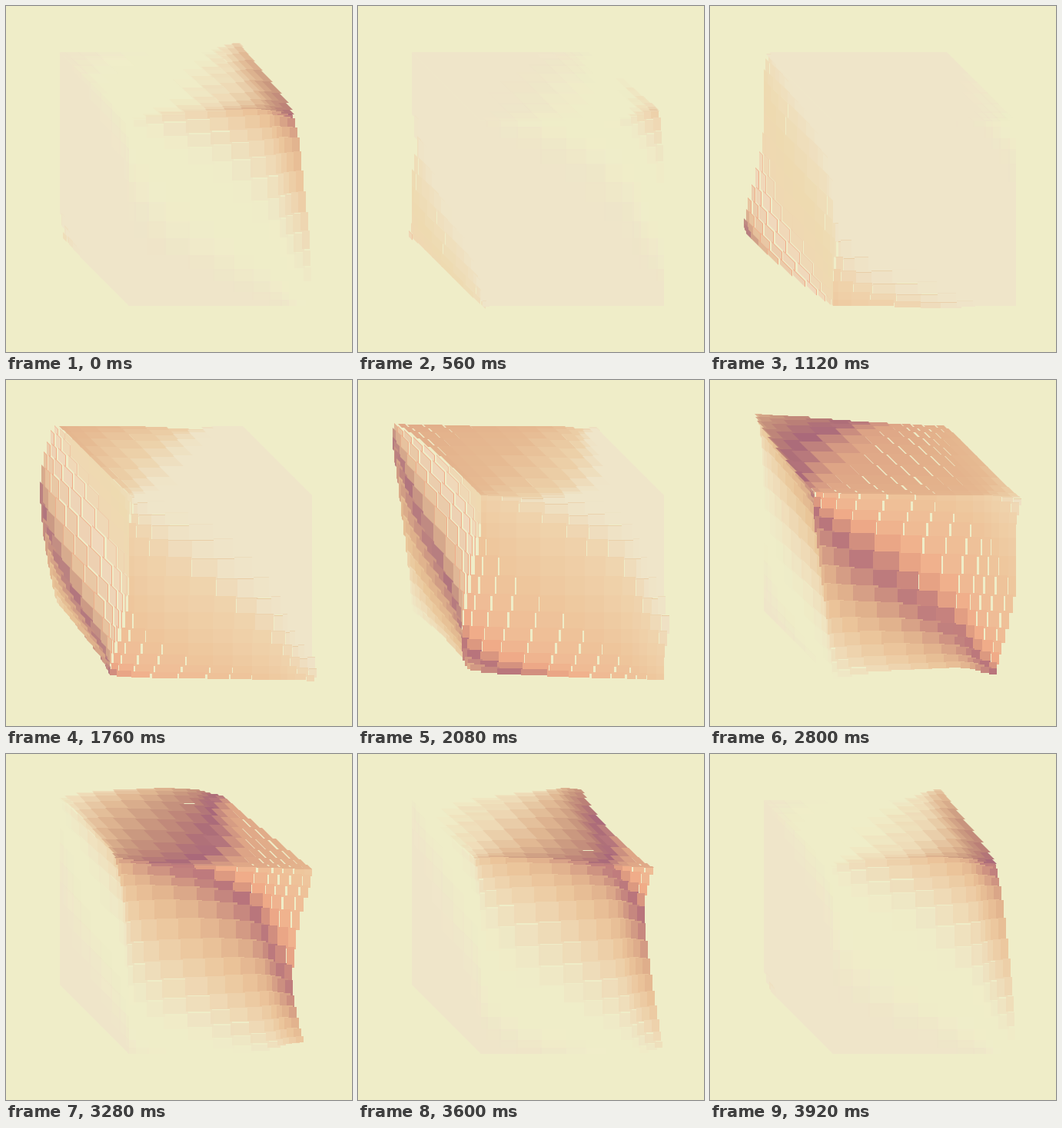
Animation of 450 by 450 pixels, one loop 4 s. Source, as an HTML page without scripts:

```html
<!DOCTYPE html>
<html lang="en">
<head>
<meta charset="utf-8">
<title>Wave over a block cube</title>
<style>
html, body { margin: 0; width: 100%; height: 100%; overflow: hidden; background: #efedc8; }
.stage {
  position: relative; width: 450px; height: 450px; overflow: hidden;
  --u: 7px 17px 22px 31px 32px 26px 25px 22px 15px 9px 10px 12px 10px;
  --v: 7px 15px 14px 19px 24px 26px 25px 22px 22px 18px 16px 14px 10px 8px;
  --w: 3px 5px 8px 10px 12px 14px 14px 11px 7px 4px 2px;
}
.face {
  position: absolute; left: 70px; top: 60px; display: grid;
  grid-template-rows: var(--rows); transform-origin: 0 0;
  --a: 0; --b: 0;
}
ul { margin: 0; padding: 0; list-style: none; display: grid; grid-template-columns: var(--cols); }
/* cells reach under their neighbours, so only thin gaps open */
li {
  position: relative; margin: 0 -2px -2px 0;
  animation: var(--tint) 4s linear infinite, drift 4s linear infinite;
  animation-delay: calc(var(--base) + var(--i) * var(--si) + var(--j) * var(--sj));
}
li:last-child { margin-right: 0; }
ul:last-child li { margin-bottom: 0; }
/* --a and --b undo the slant of a face, so every face drifts alike on screen */
.left  { --cols: var(--w); --rows: var(--v); --tint: left; --base: -3047ms; --si: 67ms; --sj: -89ms; --b: 1; transform: matrix(1, 1, 0, 1, 0, 0); }
.top   { --cols: var(--u); --rows: var(--w); --tint: top; --base: -3085ms; --si: 81ms; --sj: 64ms; --a: 1; transform: matrix(1, 0, 1, 1, 0, 0); }
.front { --cols: var(--u); --rows: var(--v); --tint: front; --base: -2312ms; --si: 81ms; --sj: -89ms; left: 160px; top: 150px; }

ul:nth-child(1) { --j: 1 } li:nth-child(1) { --i: 1 }
ul:nth-child(2) { --j: 2 } li:nth-child(2) { --i: 2 }
ul:nth-child(3) { --j: 3 } li:nth-child(3) { --i: 3 }
ul:nth-child(4) { --j: 4 } li:nth-child(4) { --i: 4 }
ul:nth-child(5) { --j: 5 } li:nth-child(5) { --i: 5 }
ul:nth-child(6) { --j: 6 } li:nth-child(6) { --i: 6 }
ul:nth-child(7) { --j: 7 } li:nth-child(7) { --i: 7 }
ul:nth-child(8) { --j: 8 } li:nth-child(8) { --i: 8 }
ul:nth-child(9) { --j: 9 } li:nth-child(9) { --i: 9 }
ul:nth-child(10) { --j: 10 } li:nth-child(10) { --i: 10 }
ul:nth-child(11) { --j: 11 } li:nth-child(11) { --i: 11 }
ul:nth-child(12) { --j: 12 } li:nth-child(12) { --i: 12 }
ul:nth-child(13) { --j: 13 } li:nth-child(13) { --i: 13 }
ul:nth-child(14) { --j: 14 }

@keyframes drift {
  0%, 57.5%, 100% { left: 0px; top: 0px }
  3.75% { left: calc(7px - 4px * var(--a)); top: calc(4px - 7px * var(--b)) }
  8.75%, 17% { left: 0px; top: 0px }
  20% { left: calc(-5px + 1px * var(--a)); top: calc(-1px + 5px * var(--b)) }
  22.8% { left: calc(-12px + 2px * var(--a)); top: calc(-2px + 12px * var(--b)) }
  27% { left: calc(-21px + 3px * var(--a)); top: calc(-3px + 21px * var(--b)) }
  31.5% { left: calc(-26px + 6px * var(--a)); top: calc(-6px + 26px * var(--b)) }
  34.6% { left: calc(-24px + 9px * var(--a)); top: calc(-9px + 24px * var(--b)) }
  38.5% { left: calc(-19px + 14px * var(--a)); top: calc(-14px + 19px * var(--b)) }
  43.8% { left: calc(-12px + 16px * var(--a)); top: calc(-16px + 12px * var(--b)) }
  50% { left: calc(-4px + 12px * var(--a)); top: calc(-12px + 4px * var(--b)) }
  55% { left: calc(-1px + 4px * var(--a)); top: calc(-4px + 1px * var(--b)) }
}
@keyframes front {
  0%, 72%, 100% { background: #efe5c9; box-shadow: inset 0 1px #e8cba200 }
  3.5% { background: #efe1c4; box-shadow: inset 0 1px #e8cba2 }
  7.5% { background: #efd3ac; box-shadow: inset 0 1px #e8cba200 }
  17.5% { background: #eec69c }
  25% { background: #efba94 }
  28.3% { background: #f0ab88 }
  30.3% { background: #db9880 }
  32.5% { background: #b8747c }
  35.6% { background: #cc8f80 }
  39.6% { background: #e0b08c }
  44% { background: #ebc49a }
  50.5% { background: #efdab6 }
  55% { background: #efe6c5c0 }
  58%, 64% { background: #efedc800 }
}
@keyframes left {
  0%, 72%, 100% { background: #efe5c9 }
  3% { background: #efe0c0 }
  10% { background: #eedab0 }
  18% { background: #efd8b2; box-shadow: inset -1px 1px #f0ab8800 }
  22% { background: #f0d8bc; box-shadow: inset -1px 1px #f0ab88 }
  28% { background: #e6c19c; box-shadow: inset -1px 1px #f0ab88 }
  30.5% { background: #cf9f86; box-shadow: inset -1px 1px #f0ab8800 }
  32.5% { background: #b0747e }
  35.6% { background: #cc9582 }
  39.6% { background: #dfb28c }
  44% { background: #e9c598 }
  50.5% { background: #efdcb8 }
  55% { background: #efe6c5c0 }
  58%, 64% { background: #efedc800 }
}
@keyframes top {
  0%, 72%, 100% { background: #efe5c9 }
  5% { background: #ecd0a8 }
  11% { background: #e6ba92 }
  20% { background: #e3b18b }
  28% { background: #dea586 }
  30.5% { background: #c78a7e }
  32.5% { background: #a9687a }
  36% { background: #bb8077 }
  40% { background: #cb9a80 }
  44% { background: #e0b792 }
  50% { background: #efdcb8 }
  56%, 64% { background: #efedc800 }
}
</style>
</head>
<body>
<div class="stage">
<div class="face left">
<ul><li><li><li><li><li><li><li><li><li><li><li></ul>
<ul><li><li><li><li><li><li><li><li><li><li><li></ul>
<ul><li><li><li><li><li><li><li><li><li><li><li></ul>
<ul><li><li><li><li><li><li><li><li><li><li><li></ul>
<ul><li><li><li><li><li><li><li><li><li><li><li></ul>
<ul><li><li><li><li><li><li><li><li><li><li><li></ul>
<ul><li><li><li><li><li><li><li><li><li><li><li></ul>
<ul><li><li><li><li><li><li><li><li><li><li><li></ul>
<ul><li><li><li><li><li><li><li><li><li><li><li></ul>
<ul><li><li><li><li><li><li><li><li><li><li><li></ul>
<ul><li><li><li><li><li><li><li><li><li><li><li></ul>
<ul><li><li><li><li><li><li><li><li><li><li><li></ul>
<ul><li><li><li><li><li><li><li><li><li><li><li></ul>
<ul><li><li><li><li><li><li><li><li><li><li><li></ul>
</div>
<div class="face top">
<ul><li><li><li><li><li><li><li><li><li><li><li><li><li></ul>
<ul><li><li><li><li><li><li><li><li><li><li><li><li><li></ul>
<ul><li><li><li><li><li><li><li><li><li><li><li><li><li></ul>
<ul><li><li><li><li><li><li><li><li><li><li><li><li><li></ul>
<ul><li><li><li><li><li><li><li><li><li><li><li><li><li></ul>
<ul><li><li><li><li><li><li><li><li><li><li><li><li><li></ul>
<ul><li><li><li><li><li><li><li><li><li><li><li><li><li></ul>
<ul><li><li><li><li><li><li><li><li><li><li><li><li><li></ul>
<ul><li><li><li><li><li><li><li><li><li><li><li><li><li></ul>
<ul><li><li><li><li><li><li><li><li><li><li><li><li><li></ul>
<ul><li><li><li><li><li><li><li><li><li><li><li><li><li></ul>
</div>
<div class="face front">
<ul><li><li><li><li><li><li><li><li><li><li><li><li><li></ul>
<ul><li><li><li><li><li><li><li><li><li><li><li><li><li></ul>
<ul><li><li><li><li><li><li><li><li><li><li><li><li><li></ul>
<ul><li><li><li><li><li><li><li><li><li><li><li><li><li></ul>
<ul><li><li><li><li><li><li><li><li><li><li><li><li><li></ul>
<ul><li><li><li><li><li><li><li><li><li><li><li><li><li></ul>
<ul><li><li><li><li><li><li><li><li><li><li><li><li><li></ul>
<ul><li><li><li><li><li><li><li><li><li><li><li><li><li></ul>
<ul><li><li><li><li><li><li><li><li><li><li><li><li><li></ul>
<ul><li><li><li><li><li><li><li><li><li><li><li><li><li></ul>
<ul><li><li><li><li><li><li><li><li><li><li><li><li><li></ul>
<ul><li><li><li><li><li><li><li><li><li><li><li><li><li></ul>
<ul><li><li><li><li><li><li><li><li><li><li><li><li><li></ul>
<ul><li><li><li><li><li><li><li><li><li><li><li><li><li></ul>
</div>
</div>
</body>
</html>
```
